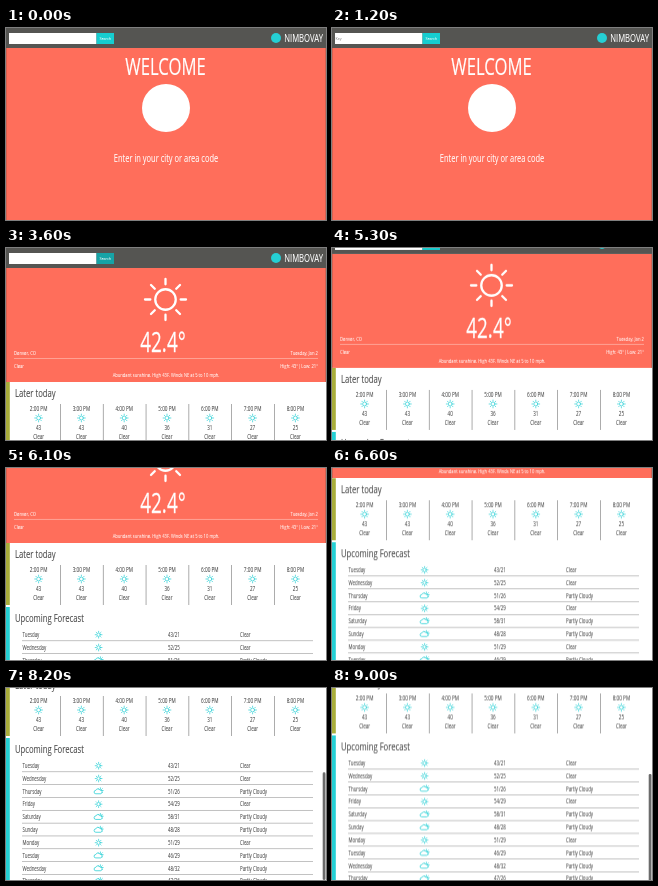
Recreate the animation shown at these times as an HTML page. Size 320x192 px, loop 9200 ms.

```html
<!DOCTYPE html>
<html lang="en">
<head>
<meta charset="utf-8">
<title>Weather search</title>
<style>
html, body { margin: 0; width: 100%; height: 100%; overflow: hidden; background: #fff; }
svg { display: block; width: 320px; height: 192px; }
text {
  font-family: "Open Sans", "Noto Sans", sans-serif;
  font-weight: 400;
  stroke: currentColor;
  fill: currentColor;
  stroke-width: .01em;
  white-space: pre;
}
.light { color: #fff; }
.dark { color: #484848; }
.tiny { color: #777; }
.page { animation: scroll 9.2s linear infinite; }
.welcome { animation: welcome 9.2s step-end infinite; }
.list { animation: list 9.2s step-end infinite; }
.button { animation: hover 9.2s step-end infinite; }
.key { fill-opacity: 0; stroke: none; animation: key 9.2s step-end infinite; }
.thumb { animation: thumb 9.2s linear infinite, thumb-show 9.2s step-end infinite; }

@keyframes scroll {
  0%, 53.261% { transform: translateY(0); animation-timing-function: ease-in; }
  57.609% { transform: translateY(-14px); animation-timing-function: cubic-bezier(.25, .4, .55, 1); }
  64.13%, 65% { transform: translateY(-55px); }
  66.304% { transform: translateY(-59px); animation-timing-function: cubic-bezier(.35, .2, .5, 1); }
  73.913%, 78.261% { transform: translateY(-131px); }
  81.522% { transform: translateY(-133px); animation-timing-function: cubic-bezier(.35, .2, .5, 1); }
  89.13% { transform: translateY(-148px); }
  95.652%, 100% { transform: translateY(-150.6px); }
}
@keyframes thumb {
  0%, 78.261% { transform: translateY(74.5px); }
  81.522% { transform: translateY(75.7px); animation-timing-function: cubic-bezier(.35, .2, .5, 1); }
  89.13% { transform: translateY(84.3px); }
  95.652%, 100% { transform: translateY(85.8px); }
}
@keyframes thumb-show { 0% { opacity: 0; } 79.348%, 100% { opacity: 1; } }
@keyframes welcome { 0% { opacity: 1; } 29.348%, 100% { opacity: 0; } }
@keyframes list { 0% { opacity: 0; } 19.565% { opacity: 1; } 29.348%, 100% { opacity: 0; } }
@keyframes key { 0% { fill-opacity: 0; } 10.87% { fill-opacity: 1; } 29.348%, 100% { fill-opacity: 0; } }
@keyframes hover { 0% { fill: #16cdd0; } 27.174% { fill: #16a3a6; } 43.478%, 100% { fill: #16cdd0; } }
</style>
</head>
<body>
<svg id="stage" viewBox="0 0 320 192" xmlns="http://www.w3.org/2000/svg"></svg>
<script>
const RED = '#ff6e5b', EDGE = '#c9604f', TEAL = '#25cfd4', OLIVE = '#a9ad3a';
const CONDENSE = 0.7; // one ratio gives all headings and labels a condensed face

const text = (str, x, y, size, tone = 'dark', anchor = 'start') =>
  `<text class="${tone}" transform="translate(${x} ${y}) scale(${CONDENSE} 1)" font-size="${size}" text-anchor="${anchor}">${str}</text>`;
const small = (str, x, y, tone, anchor = 'start') =>
  `<text class="${tone}" x="${x}" y="${y}" font-size="3.7" text-anchor="${anchor}">${str}</text>`;
const rect = (x, y, w, h, fill, extra = '') =>
  `<rect x="${x}" y="${y}" width="${w}" height="${h}" fill="${fill}" ${extra}/>`;
const dot = (x, y, r, fill) => `<circle cx="${x}" cy="${y}" r="${r}" fill="${fill}"/>`;
const panel = h => rect(0, 20, 320, h, EDGE) + rect(.8, 20, 318.4, h, RED);

function sun(x, y, r, width, color) {
  let rays = '';
  for (let i = 0; i < 8; i++) {
    const c = Math.cos(i * Math.PI / 4), s = Math.sin(i * Math.PI / 4);
    rays += `M${c * r * .74} ${s * r * .74}L${c * r} ${s * r}`;
  }
  return `<g transform="translate(${x} ${y})" fill="none" stroke="${color}" stroke-width="${width}" stroke-linecap="round">
    <circle r="${r * .5}"/><path d="${rays}"/></g>`;
}

const cloud = (x, y) => sun(x + 1.6, y - .8, 2.8, .7, TEAL) +
  `<path transform="translate(${x - .6} ${y + .2}) scale(.85)" d="M-2.8 2.6a2 2 0 0 1 0-4a2.6 2.6 0 0 1 4.8-.3a2.1 2.1 0 0 1 .8 4.3z"
    fill="#fff" stroke="${TEAL}" stroke-width=".9"/>`;

function header() {
  return rect(0, 0, 320, 20, '#555552') +
    rect(3, 5, 87.5, 11, '#fff') +
    rect(90.5, 5, 17.5, 11, TEAL, 'class="button"') +
    small('Search', 99.2, 11.7, 'light', 'middle') +
    dot(270, 10, 5, TEAL) +
    text('NIMBOVAY', 317, 13.9, 11, 'light', 'end');
}

function current() {
  return panel(114) +
    sun(159.5, 51.5, 20.5, 2.3, '#fff') +
    text('42.4°', 157, 104, 27, 'light', 'middle') +
    text('Denver, CO', 8, 107, 6, 'light') +
    text('Tuesday, Jan 2', 312, 107, 6, 'light', 'end') +
    rect(8, 110.3, 304, .6, '#ffc4bb') +
    text('Clear', 8, 120, 6, 'light') +
    text('High: 43°| Low: 21°', 312, 120, 6, 'light', 'end') +
    text('Abundant sunshine. High 43F. Winds NE at 5 to 10 mph.', 160, 129, 5.9, 'light', 'middle');
}

function hours() {
  const cells = [43, 43, 40, 36, 31, 27, 25].map((temp, i) => {
    const x = 32.6 + i * 42.8;
    return text(`${i + 2}:00 PM`, x, 163.4, 6.7, 'dark', 'middle') +
      sun(x, 170, 3.9, .7, TEAL) +
      text(temp, x, 182.2, 6.5, 'dark', 'middle') +
      text('Clear', x, 191.2, 6.5, 'dark', 'middle') +
      (i ? rect(x - 21.3, 156, .7, 40, '#888') : '');
  });
  return rect(0, 134, 3.8, 62, OLIVE) + text('Later today', 9, 148.5, 11) + cells.join('');
}

function forecast() {
  const days = ['Tuesday', 'Wednesday', 'Thursday', 'Friday', 'Saturday', 'Sunday', 'Monday'];
  const temps = '43/21 52/25 51/26 54/29 58/31 48/28 51/29 46/29 48/32 47/26'.split(' ');
  const clear = [0, 1, 3, 6];
  const rows = temps.map((range, i) => {
    const y = 225.7 + i * 12.83, fair = clear.includes(i);
    return text(days[i % 7], 16.5, y + 2.3, 6.3) +
      (fair ? sun(92.6, y, 3.4, .7, TEAL) : cloud(92.8, y)) +
      text(range, 162, y + 2.3, 6.3) +
      text(fair ? 'Clear' : 'Partly Cloudy', 234, y + 2.3, 6.3) +
      rect(16, y + 5.8, 291, .6, '#999');
  });
  return rect(0, 198, 3.8, 160, TEAL) + text('Upcoming Forecast', 9, 212.8, 11) + rows.join('');
}

function welcome() {
  const typed = [...'Keyword'].map((c, i) =>
    `<tspan class="key" style="animation-delay:${i * 100}ms">${c}</tspan>`).join('');
  return `<g class="welcome">` +
    panel(172) +
    text('WELCOME', 159.5, 46.5, 23.8, 'light', 'middle') +
    dot(160, 80, 24, '#fff') +
    text('Enter in your city or area code', 160, 133.7, 10.7, 'light', 'middle') +
    small(typed, 3.5, 11.8, 'tiny') +
    `<g class="list">${rect(3, 18.2, 84.5, 5.2, '#fff', 'stroke="#888" stroke-width=".5"')}${small('Denver, Co', 3.8, 22, 'dark')}</g></g>`;
}

document.getElementById('stage').innerHTML =
  `<g class="page">${current() + hours() + forecast() + header() + welcome()}</g>` +
  rect(316.7, 0, 2.8, 108, '#6b6b6b', 'rx="1.4" class="thumb"');
</script>
</body>
</html>
```
